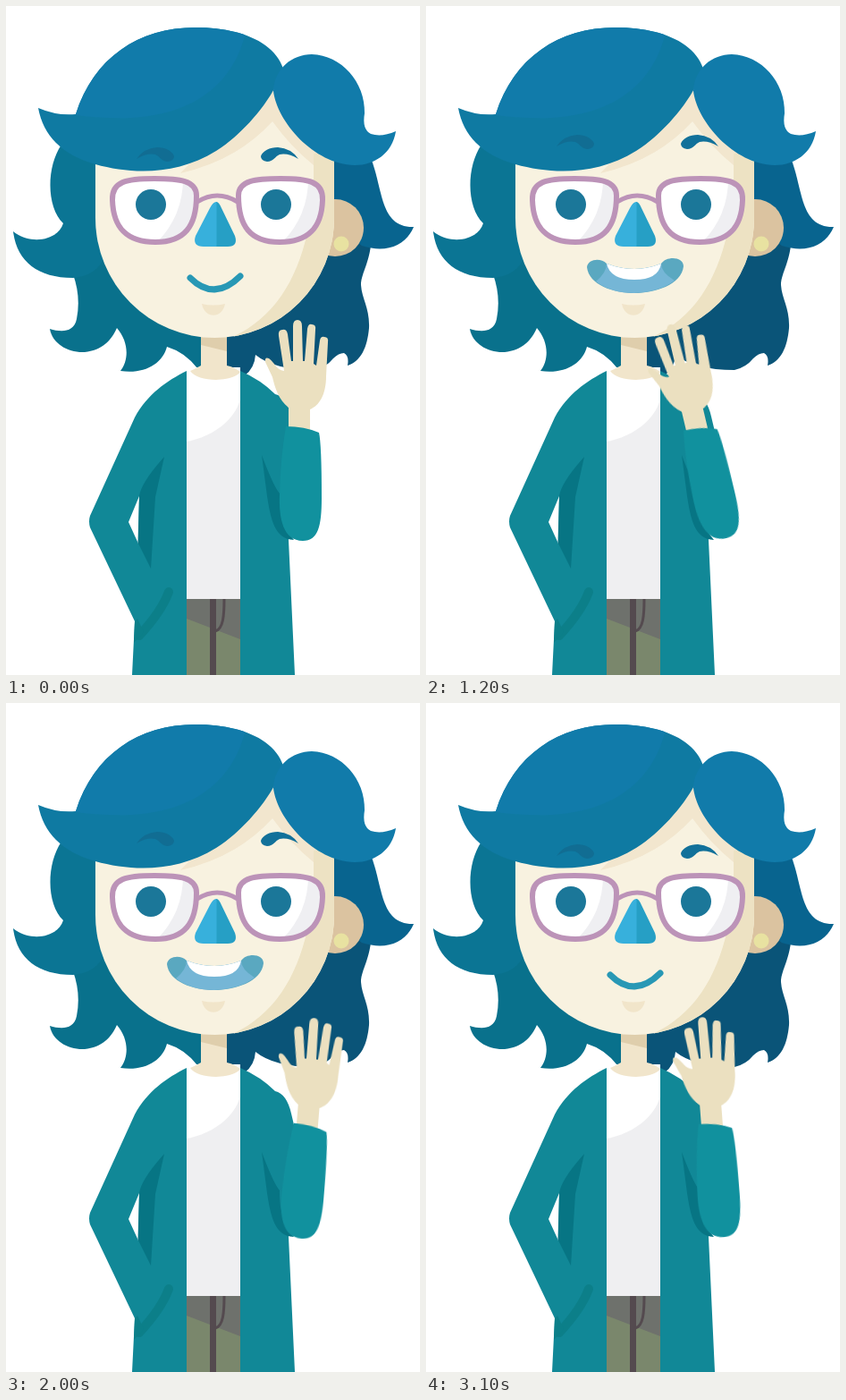
Recreate the animation shown at these times as an HTML page without scripts. Size 463x748 px, loop 8.1 s.

```html
<!DOCTYPE html>
<html lang="en">
<head>
<meta charset="utf-8">
<title>Waving hello</title>
<style>
  html, body { margin: 0; width: 100%; height: 100%; overflow: hidden; background: #fff; }
  svg { display: block; width: 100vw; height: 100vh; }

  .arm, .brows, .grin, .smile { animation: 8.1s steps(1) infinite; }
  .arm { transform-origin: 321px 580px; animation-name: wave; }
  .brows { animation-name: raise; }
  .grin { animation-name: show; }
  .smile { animation-name: hide; }

  /* two waves of 1.6s, then a long rest */
  @keyframes wave {
    0%, 19.7531% { transform: rotate(0deg); }
    1.2346%, 20.9877% { transform: rotate(4.7deg); }
    2.4691%, 3.7037%, 22.2222%, 23.4568% { transform: rotate(8deg); }
    4.9383%, 24.6914% { transform: rotate(4.7deg); animation-timing-function: steps(3); }
    8.642%, 28.3951% { transform: rotate(-7.4deg); animation-timing-function: steps(2); }
    11.1111%, 30.8642% { transform: rotate(-12.4deg); }
    12.3457%, 32.0988% { transform: rotate(-13.3deg); }
    14.8148%, 34.5679% { transform: rotate(-13.3deg); animation-timing-function: steps(3); }
    18.5185%, 38.2716%, 100% { transform: rotate(-4.3deg); }
  }
  @keyframes raise {
    0%, 38.2716%, 100% { transform: translateY(14px); }
    1.2346% { transform: none; }
  }
  @keyframes show {
    0%, 38.2716%, 100% { opacity: 0; }
    1.2346% { opacity: 1; }
  }
  @keyframes hide {
    0%, 38.2716%, 100% { opacity: 1; }
    1.2346% { opacity: 0; }
  }
</style>
</head>
<body>
<svg viewBox="0 0 463 748" preserveAspectRatio="none">
  <defs>
    <path id="lens" d="M119 217C118 196 135 193 166 193C194 193 213 195 213 212C213 246 200 264 167 264C136 264 120 249 119 217Z"/>
    <path id="fringe" d="M36 114Q57 123 78 121C98 58 148 24 212 24C262 24 300 40 310 70C300 102 268 141 235 162C190 190 140 188 100 177C62 166 42 145 36 114Z"/>
    <path id="brow" d="M285 154C287 148 295 144 304 144Q319 145 327 157Q315 150 306 152C301 154 299 160 292 160Q285 159 285 154Z"/>
    <path id="face" d="M100 160V237A133.500 134 0 0 0 367 237V120L300 90Z"/>
    <clipPath id="inLens"><use href="#lens"/></clipPath>
    <clipPath id="inLensR"><use href="#lens" transform="matrix(-1 0 0 1 473 0)"/></clipPath>
    <clipPath id="inFringe"><use href="#fringe"/></clipPath>
    <clipPath id="inFace"><use href="#face"/></clipPath>
  </defs>

  <!-- back hair -->
  <path fill="#09718c" d="M75 300Q84 325 79 350C76 365 62 365 49 361C52 378 70 388 88 387C107 385 118 374 124 360C137 375 138 395 128 408C155 412 175 400 180 381Q200 387 214 405L230 400V250H90Z"/>
  <path fill="#0b7594" d="M62 155C45 180 45 225 64 243C58 262 28 268 8 252C12 285 35 304 75 304C94 302 105 294 110 280L130 150Z"/>
  <path fill="#0a5478" d="M247 350V404L267 413Q278 405 279 390Q300 407 345 407Q358 404 366 394Q372 388 378 388Q384 391 382 402C397 397 404 382 406 360C407 338 398 328 397 312C397 300 405 290 408 268L365 240Z"/>
  <path fill="#08648f" d="M360 150L408 170C422 205 418 248 456 247C447 268 425 277 398 268L360 240Z"/>
  <circle cx="368" cy="248" r="32" fill="#dbc3a0"/>
  <circle cx="375" cy="266" r="8.5" fill="#e8e2a1"/>

  <!-- body -->
  <path fill="#efeff1" d="M202 408H262V664H202Z"/>
  <path fill="#fff" d="M202 404H262V440C255 464 230 482 202 487Z"/>
  <path fill="#f1e5cb" d="M218 360H247V402Q256 404 262 409C254 421 214 421 206 408Q211 406 218 402Z"/>
  <path fill="#dfceac" d="M218 368H247V386L218 379Z"/>
  <path fill="#7a876c" d="M202 663H262V748H202Z"/>
  <path fill="#6e716c" d="M202 663H262V708L202 685Z"/>
  <path fill="#544a4f" d="M228 663H235V748H228Z"/>
  <path fill="none" stroke="#544a4f" stroke-width="3" d="M244 663C244 681 243 697 234 699"/>

  <!-- cardigan -->
  <path fill="#118897" fill-rule="evenodd" d="M202 408C180 419 158 434 144 460L94 570Q92 576 94 583L144 688L141 748H202ZM149 548L137 577L148 601Z"/>
  <path fill="#118897" d="M262 408Q285 418 301 434Q314 437 319 459L324 480L316 597L323 748H262Z"/>
  <path fill="#077584" d="M177 504Q151 533 149 548L147.500 600L162 629L167 549Z"/>
  <path fill="none" stroke="#0c7f89" stroke-width="10" stroke-linecap="round" d="M182 655Q174 677 149 704"/>
  <path fill="#0c7f89" d="M144 688L147 685L154 700L143 712Z"/>
  <path fill="#077584" d="M286 502Q299 537 306 545Q305 578 322 597C300 596 296 573 292 548Z"/>

  <!-- face -->
  <use href="#face" fill="#f8f2e0"/>
  <g clip-path="url(#inFace)">
    <path fill="#f2e6ce" d="M300 80L195 187Q258 173 298 129Q318 157 344 178H367Z"/>
    <path fill="#ede2c3" d="M344 165V195C341 276 314 344 251 371H370V165Z"/>
  </g>
  <path fill="#f1e5ca" d="M219 333Q232 336 245 333C242 350 222 350 219 333Z"/>

  <!-- front hair -->
  <use href="#fringe" fill="#0f7aa2"/>
  <path clip-path="url(#inFringe)" fill="#117baa" d="M78 122Q110 126 140 125C200 122 252 95 268 30L200 0L60 20Z"/>
  <path fill="#117baa" d="M299 95C300 70 320 54 342 54C375 55 402 85 401 120Q398 138 408 143Q420 147 436 140C432 165 412 178 390 178C344 177 303 129 299 95Z"/>

  <g class="brows">
    <use href="#brow" fill="#12719a"/>
    <use href="#brow" fill="#116d93" transform="matrix(-1 0 0 1 473 0)"/>
  </g>

  <!-- glasses and eyes -->
  <use href="#lens" fill="#fff"/>
  <use href="#lens" fill="#fff" transform="matrix(-1 0 0 1 473 0)"/>
  <path clip-path="url(#inLens)" fill="#efeff2" d="M198 190Q199 235 167 266H220V190Z"/>
  <path clip-path="url(#inLensR)" fill="#efeff2" d="M338 190Q339 235 307 266H360V190Z"/>
  <g fill="#1b7799">
    <circle cx="162" cy="222" r="17"/>
    <circle cx="302" cy="222" r="17"/>
  </g>
  <g fill="none" stroke="#bc93b8" stroke-width="6">
    <use href="#lens"/>
    <use href="#lens" transform="matrix(-1 0 0 1 473 0)"/>
    <path stroke-width="5" d="M214 219Q236 205 259 219"/>
  </g>

  <!-- nose -->
  <path fill="#37b0dc" d="M236 219Q232 218 228 226L212 257Q208 269 221 269H236Z"/>
  <path fill="#269fc5" d="M235.500 219Q238 219 241 226L256 257Q260 269 248 269H235.500Z"/>

  <!-- mouth -->
  <path class="smile" fill="none" stroke="#2898b5" stroke-width="7" stroke-linecap="round" d="M206 304Q233 331 262 302"/>
  <g class="grin">
    <path fill="#5aa8c0" d="M180 292C181 283 195 281 202 288Q233 300 263 288C269 279 288 280 288 291C286 312 255 321 233 321C210 321 182 312 180 292Z"/>
    <path fill="#75b6d6" d="M202 288Q202 298 190 308Q207 321 233 321Q261 320 278 307Q263 298 263 288Q233 300 202 288Z"/>
    <path fill="#fff" d="M202 288Q233 300 263 288Q260 306 233 306Q206 306 202 288Z"/>
  </g>

  <!-- waving arm -->
  <g class="arm">
    <path fill="#ebe0c0" d="M316 480V449C305 440 301 428 298 415L290 398Q289 392 294 394C301 399 302 407 311 408L305 369Q304 362 309 362Q314 361 315 367L319 397H321V358Q321 351 326 351Q331 351 331 358L332 397H334L337 361Q338 355 342 356Q347 356 346 362L344 400L347 402L351 374Q352 369 356 370Q361 370 360 376L358 414C358 435 350 447 340 451V482Z"/>
    <path fill="#11919e" d="M313 470Q334 470 350 477Q353 490 353 550C353 582 349 598 332 598C310 598 305 573 306 546Q307 505 313 470Z"/>
  </g>
</svg>
</body>
</html>
```
